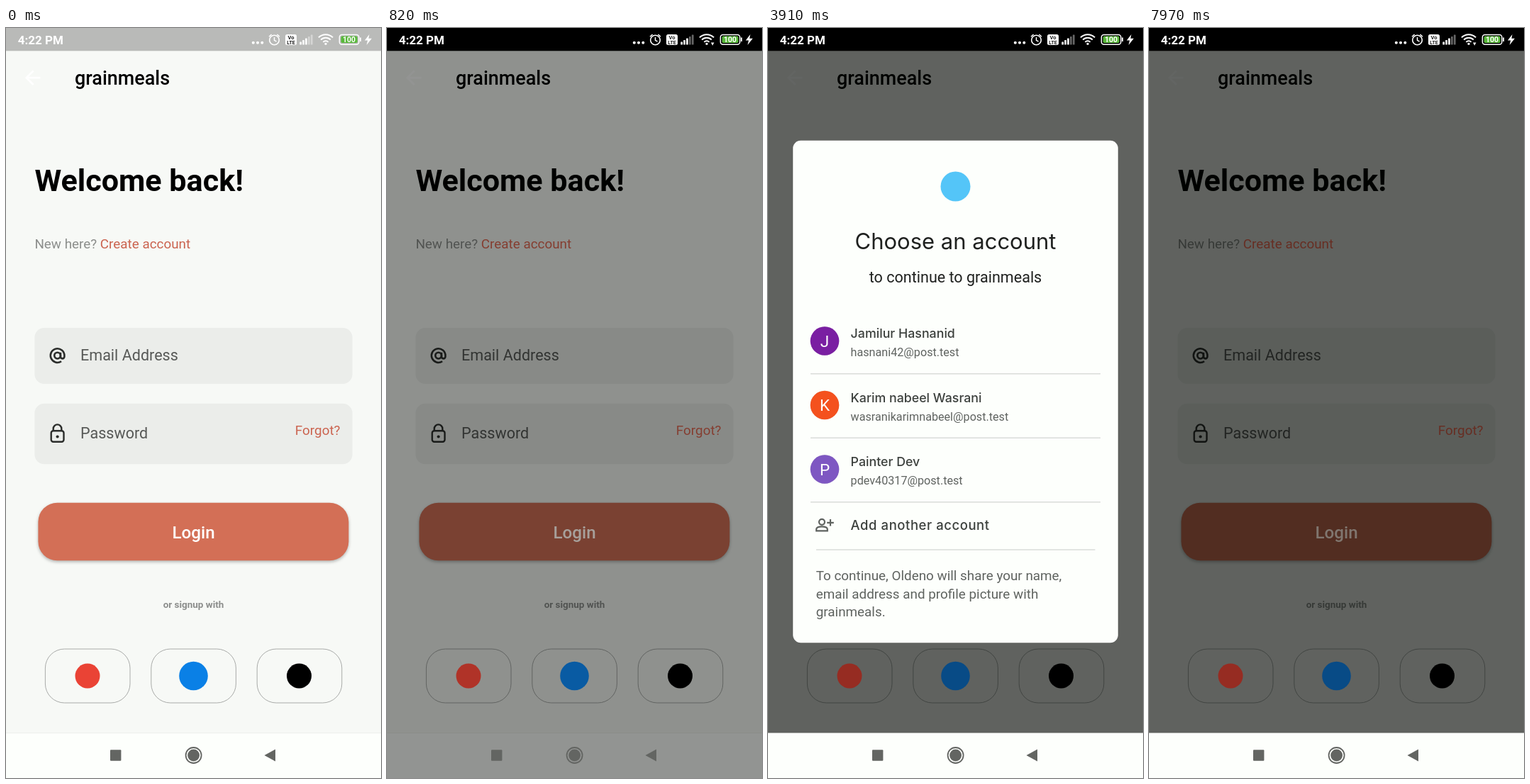
An HTML page that plays this animation: 529 by 1058 pixels, repeating every 8 s.

```html
<!DOCTYPE html>
<html lang="en">
<head>
<meta charset="utf-8">
<title>Login</title>
<style>
  html, body { margin: 0; width: 100%; height: 100%; overflow: hidden; background: #f7f9f6; }
  svg { display: block; width: 529px; height: 1058px; }
  text { font-family: Roboto, Arial, sans-serif; white-space: pre; }
  .med { font-weight: 500; }
  .bold { font-weight: 700; }
  .mid { text-anchor: middle; }
  .end { text-anchor: end; }
  .inter { font-family: Inter, sans-serif; }
  #login { filter: drop-shadow(0 2px 2px rgba(0, 0, 0, .28)); }
</style>
</head>
<body>
<svg id="stage" viewBox="0 0 529 1058"></svg>
<script>
const LOOP = 8000;
const APP = 'grainmeals';
const USERS = [
  ['Jamilur Hasnanid', 'hasnani42@post.test', 'J', '#7a1fa2'],
  ['Karim nabeel Wasrani', 'wasranikarimnabeel@post.test', 'K', '#f4511e'],
  ['Painter Dev', 'pdev40317@post.test', 'P', '#7e57c2']
];

// Markup helpers
const rect = (x, y, w, h, r, attrs) =>
  `<rect x="${x}" y="${y}" width="${w}" height="${h}" rx="${r}" ${attrs}/>`;
const dot = (x, y, r, attrs) => `<circle cx="${x}" cy="${y}" r="${r}" ${attrs}/>`;
const path = (d, attrs) => `<path d="${d}" ${attrs}/>`;
const text = (x, y, size, fill, str, cls = '', attrs = '') =>
  `<text x="${x}" y="${y}" font-size="${size}" fill="${fill}" class="${cls}" ${attrs}>${str}</text>`;
const group = (id, body, attrs = '') => `<g id="${id}" ${attrs}>${body}</g>`;
const line = (x1, x2, y) => path(`M${x1} ${y}H${x2}`, 'stroke="#dadcda" stroke-width="1.6"');

function page() {
  const pen = 'fill="none" stroke="#2b2d2b" stroke-width="2.4"';
  const at = group('at', dot(12, 12, 4, pen) + path('M16 8v5.4a2.5 2.5 0 0 0 5 0V12a9 9 0 1 0-4 7.5', pen),
    'transform="translate(59.5 449) scale(1.09)"');
  const lock = path('M66.7 568V565.2a5.8 5.8 0 0 1 11.6 0V568', pen) +
    rect(63.7, 568.2, 17.8, 15.6, 3, pen) +
    dot(72.6, 576.5, 2.1, 'fill="#2b2d2b"');
  const boxes = [55.4, 204.8, 354.2].map(x =>
    rect(x, 876, 119.6, 76, 27, 'fill="none" stroke="#a9aba9"')).join('');
  return rect(0, 0, 529, 1058, 0, 'fill="#f7f9f6"') +
    path('M20 11H7.83l5.59-5.59L12 4l-8 8 8 8 1.41-1.41L7.83 13H20z', 'fill="#fff" transform="translate(21.5 54) scale(1.347)"') +
    text(97, 80, 26.94, '#000', APP, 'med') +
    text(40.4, 230, 43.1, '#000', 'Welcome back!', 'bold') +
    text(40.4, 311, 18.86, '#8c8e8c', 'New here?') +
    rect(40.4, 423, 448.2, 79, 13.5, 'fill="#ebedea"') +
    rect(40.4, 529.7, 448.2, 85.6, 13.5, 'fill="#ebedea"') + at + lock +
    text(105, 469, 21.55, '#575957', 'Email Address') +
    text(105, 578.5, 21.55, '#575957', 'Password') +
    rect(45.4, 669.7, 438, 81.6, 27, 'id="login" fill="#d36f56"') +
    text(264.5, 817.5, 13.47, '#8c8e8c', 'or signup with', 'bold mid') + boxes +
    rect(0, 994.4, 529, 64, 0, 'fill="#fdfffc"') +
    path('M0 994.5H529', 'stroke="#eef0ed"');
}

// Parts that keep more of their colour while the page darkens
function accents() {
  return text(132.8, 311, 18.86, '#cb6450', 'Create account', '', 'id="create"') +
    text(471.5, 574, 18.86, '#cb6450', 'Forgot?', 'end', 'id="forgot"') +
    text(264.5, 719.5, 24.2, '#fff', 'Login', 'med mid', 'id="loginText"') +
    dot(115, 914, 17.5, 'id="red" fill="#ea4335"') +
    dot(264.5, 914, 20.3, 'id="blue" fill="#0a80e6"') +
    dot(413.5, 914, 17.5, 'fill="#000"');
}

function navIcons() {
  const c = '#636562';
  return rect(147, 1018.3, 15.4, 15.4, 1, `fill="${c}"`) +
    dot(264.6, 1026, 11, `fill="none" stroke="${c}" stroke-width="1.8"`) +
    dot(264.6, 1026, 8.4, `fill="${c}"`) +
    path('M364.5 1026L380 1017.4V1034.6Z', `fill="${c}"`);
}

function statusIcons() {
  const w = 'fill="#fff"';
  const pen = s => `fill="none" stroke="#fff" stroke-width="${s}"`;
  const arc = r => {
    const k = r * .72;
    return path(`M${451 - k} ${23.5 - k}A${r} ${r} 0 0 1 ${451 + k} ${23.5 - k}`, pen(2));
  };
  const bars = [0, 1, 2, 3, 4].map(i => {
    const h = 4 + i * 2.5;
    return rect(414.3 + i * 3.9, 23.5 - h, 2.7, h, .6, `${w} ${i > 2 ? `id="bar${i}" opacity=".4"` : ''}`);
  }).join('');
  return text(16.7, 22.5, 17, '#fff', '4:22 PM', 'bold') +
    [348.8, 355, 361.3].map(x => dot(x, 20.8, 2, w)).join('') +
    dot(378.5, 17, 6.8, pen(1.6)) +
    path('M378.5 13V17.3L381.5 19M371 12.2L374.6 9M382.4 9L386 12.2', pen(1.5)) +
    rect(394, 9, 16, 15, 2.5, w) +
    text(402, 16, 7.5, '#222', 'Vo', 'bold mid') +
    text(402, 23, 7, '#222', 'LTE', 'bold mid') + bars +
    arc(14) + arc(9.5) + arc(5) + dot(451, 22.3, 1.6, w) +
    path('M457 20.5H461.5L459.2 24.8Z', 'id="data" fill="#fff"') +
    rect(470.4, 9.4, 27.4, 13.8, 3.5, pen(1.5)) +
    rect(472.6, 11.6, 23, 9.4, 1.8, 'fill="#58b83a"') +
    rect(499.2, 13.2, 1.8, 6, .9, w) +
    text(484.1, 20.2, 10.5, '#fff', '100', 'bold mid') +
    path('M512.5 9L506 17.6H510.2L508.6 24L516 14.8H511.4Z', w);
}

function person(y) {
  const pen = 'fill="none" stroke="#5f6360" stroke-width="2.2"';
  return dot(76, y - 4.2, 4, pen) +
    path(`M68.2 ${y + 8.3}V${y + 6}C68.2 ${y + 1.2} 83.8 ${y + 1.2} 83.8 ${y + 6}V${y + 8.3}Z`, pen) +
    path(`M88 ${y - 8}V${y + 1.6}M83.2 ${y - 3.2}H92.8`, pen);
}

// One arrangement of the account chooser; o holds its vertical places
function card(id, o) {
  let s = rect(35.2, o.top, 458.6, o.h, 11, 'fill="#fdfffc"') +
    dot(264.5, o.logo, 21, 'fill="#54c5f8"') +
    text(264.5, o.title, o.late ? 31 : 32.33, '#1f211f', 'Choose an account', o.late ? 'inter mid' : 'mid') +
    text(264.5, o.sub, 21.55, '#1f211f', `to continue to ${APP}`, 'mid');
  let faces = '';
  USERS.forEach(([name, mail, letter, tint], i) => {
    const y = o.rows[i];
    const plain = !o.late && i === 0;
    s += dot(80, y, 19.8, 'fill="#eff1ee" stroke="#d4d6d3"') +
      text(116.6, y - (plain ? 3.5 : 4.5), plain ? 18.86 : 17.8, '#3c403d', name, plain ? '' : 'inter med') +
      text(116.6, y + (plain ? 20 : 21.5), 16.16, '#5f6360', mail) +
      line(60, 469, y + (plain ? 44.5 : 46.3));
    faces += dot(80, y, 20.3, `fill="${tint}"`) + text(80, y + 8, 22.5, '#fff', letter, 'mid');
  });
  if (o.late) s += group('faces', faces);
  s += person(o.add - 7) +
    text(116.6, o.add, 18.5, '#3c403d', 'Add another account', 'inter med', 'letter-spacing=".55"') +
    line(68, 461.5, o.add + 28);
  ['To continue, Oldeno will share your name,', 'email address and profile picture with', `${APP}.`]
    .forEach((t, i) => s += text(67.7, o.add + 71 + i * 25.5, 18.86, '#5f6360', t));
  return group(id, s);
}

document.getElementById('stage').innerHTML =
  page() +
  rect(0, 0, 529, 1058, 0, 'id="dim" fill="#000400"') +
  accents() +
  rect(0, 994.4, 529, 64, 0, 'id="nav" fill="#fdfffc"') +
  navIcons() +
  group('dialog',
    card('early', { top: 214, h: 702, logo: 278.5, title: 367, sub: 409.5, rows: [491.5, 580.5, 671], add: 756.5 }) +
    card('settled', { top: 158.7, h: 708.5, logo: 223.5, title: 311.5, sub: 358.5, rows: [441.5, 532, 622.5], add: 708, late: true })) +
  rect(0, 0, 529, 32.3, 0, 'id="status" fill="#000"') +
  statusIcons();

// Steps are [ms, value]; hard steps jump instead of blending
function track(id, prop, steps, hard = false) {
  const frames = steps.map(([t, v]) => ({ offset: t / LOOP, [prop]: v, easing: hard ? 'step-end' : 'linear' }));
  frames.unshift({ ...frames[0], offset: 0 });
  frames.push({ ...frames[frames.length - 1], offset: 1 });
  document.getElementById(id).animate(frames, { duration: LOOP, iterations: Infinity });
}

const DIM = [480, 970];
const darken = (id, prop, a, b) => track(id, prop, [[DIM[0], a], [DIM[1], b]]);
darken('dim', 'opacity', 0, .61);
darken('create', 'fill', '#cb6450', '#672e23');
darken('forgot', 'fill', '#cb6450', '#672e23');
darken('loginText', 'fill', '#ffffff', '#80766f');
darken('red', 'fill', '#ea4335', '#962c22');
darken('blue', 'fill', '#0a80e6', '#084b86');

track('status', 'opacity', [[0, .25], [500, 1]], true);
track('nav', 'opacity', [[0, 0], [970, 1]], true);
track('dialog', 'opacity', [[2160, 0], [2300, 1], [5420, 1], [5560, 0]]);
track('early', 'opacity', [[0, 1], [2640, 0]], true);
track('settled', 'opacity', [[0, 0], [2640, 1]], true);
track('faces', 'opacity', [[0, 0], [3050, 1]], true);
track('data', 'opacity', [[0, 0], [60, 1], [2100, 0], [6300, 1]], true);
track('bar3', 'opacity', [[0, .4], [5400, 1], [6300, .4]], true);
track('bar4', 'opacity', [[0, .4], [5400, .8], [6300, .4]], true);
</script>
</body>
</html>
```
